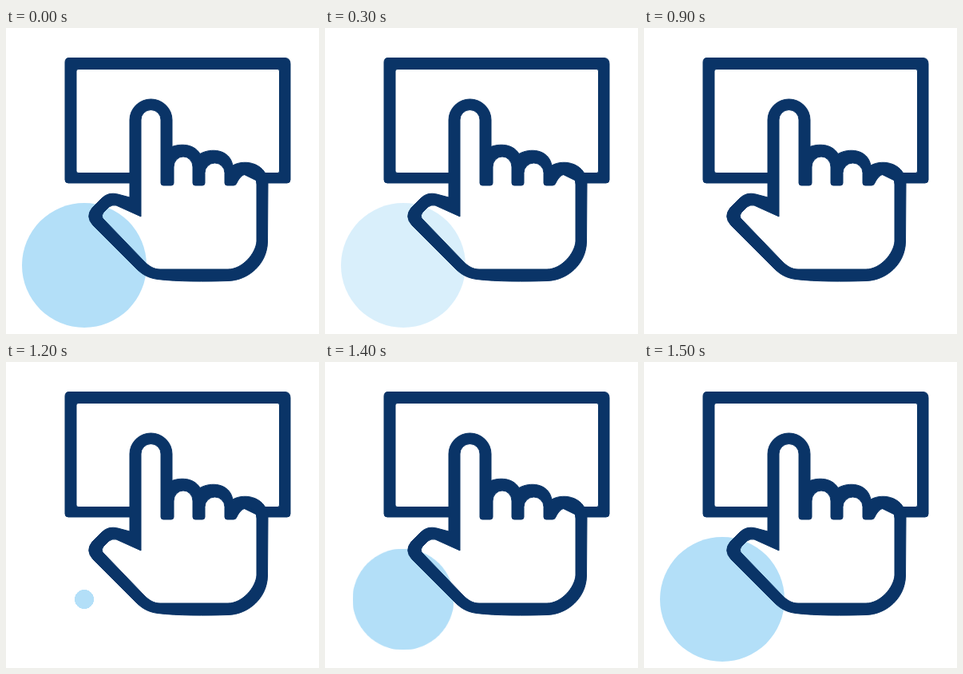
These frames come from a looping animation (392x383 px, 1.6 s). An HTML page:

```html
<!DOCTYPE html>
<html lang="en">
<head>
<meta charset="utf-8">
<title>Tap</title>
<style>
  html, body { margin: 0; width: 100%; height: 100%; overflow: hidden; background: #fff; }
  svg { display: block; width: 392px; height: 383px; }
  .ink { fill: #0a3467; fill-rule: evenodd; stroke: #0a3467; stroke-width: 1; }
  .paper { fill: #fff; }
  .hand { animation: press 1.6s step-end infinite; }
  .ripple { fill: #b3dff8; transform-origin: 98px 297px; animation: ripple 1.6s step-end infinite; }
  @keyframes press {
    0%, 56.25% { transform: translateY(0); }
    25% { transform: translateY(-15px); }
  }
  /* 100 ms = 6.25% */
  @keyframes ripple {
    0% { transform: scale(1); opacity: 1; }
    18.75% { transform: scale(1); opacity: .5; }
    25% { transform: scale(0); opacity: 1; }
    75% { transform: scale(.154); }
    81.25% { transform: scale(.487); }
    87.5% { transform: scale(.814); }
    93.75%, 100% { transform: scale(1); opacity: 1; }
  }
</style>
</head>
<body>
<svg viewBox="0 0 392 383">
  <path class="ink" d="M78 37.500H350Q356 38 356 45V190Q356 194 352 194H78Q74 194 74 190V43Q74 38 78 37.500ZM91 51.500Q88 51.500 88 54V179Q88 181.500 91 181.500H340Q342.500 181.500 342.500 179V54Q342.500 51.500 340 51.500Z"/>
  <!-- The ripple sits on the hand's fill but under its outline -->
  <path class="hand paper" d="M160 220V115A21 21 0 0 1 203 115V155L240 163L280 175L321 195V268C320 290 300 308 278 309H193C180 308 172 301 167 296L115 242Q106 235 114 228L124 218Q130 213 140 215L160 222Z"/>
  <circle class="ripple" cx="98" cy="297" r="78"/>
  <path class="hand ink" d="M155 212V115A26.500 26 0 0 1 208 115V148.500C217 145 235 144 243 157.500C256 150 280 151 284 172C300 163 328 170 328 195L327.500 268C327 295 304 316 278 316.500C250 317.500 215 317.500 190 314.500C179 313 171 309 163 301L109 247Q99 236 108 225L120 213Q128 205 140 208Z
    M169 236V115A12.500 12.500 0 0 1 194 115V194Q194 197 197 197H207Q210 197 210 194V174A12 13 0 0 1 234 174V194Q234 197 237 197H246Q249 197 249 194V181.500A12.500 12.500 0 0 1 274 181.500V194Q274 197 277 197H285Q288 197 289 194C293 186 297 183 302 183Q314 183 314 196V267C313 282 296 302 278 302H193C185 302 179 298 173 292L121 238Q119 235 122 231L129 224Q133 221 138 222Z"/>
</svg>
</body>
</html>
```
